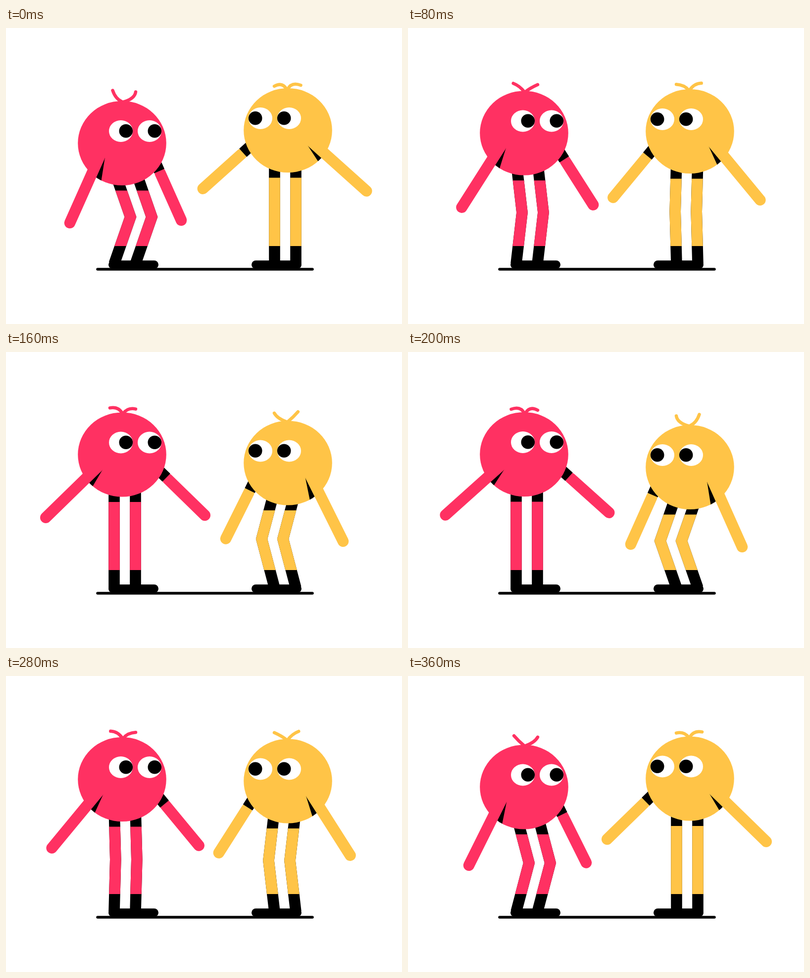
Recreate the animation shown at these times as an HTML page with a canvas. Size 800x600 px, loop 400 ms.

```html
<!DOCTYPE html>
<html lang="en">
<head>
<meta charset="utf-8">
<title>Two bouncing friends</title>
<style>
  html, body { margin: 0; height: 100%; overflow: hidden; background: #fff; }
  canvas { display: block; }
</style>
</head>
<body>
<canvas id="stage" width="800" height="600"></canvas>
<script>
const ctx = document.getElementById('stage').getContext('2d');
const STEP = 40, STEPS = 10, AXIS = 402;
const LIMB = 22.6, BODY_X = 234.5, ANKLE_X = 218.5, LEG_GAP = 43;

// From crouching to standing; hair control points are relative to the body.
const poses = [
  { y: 233.5, arm: 24,   knee: [251.5, 383], hair: [221, -90, 260, -90] },
  { y: 225,   arm: 26.4, knee: [244.5, 379], hair: [223.5, -93, 256, -90] },
  { y: 213,   arm: 32.4, knee: [230.5, 374], hair: [225.5, -96, 247, -91.5] },
  { y: 209.5, arm: 39.5, knee: [221.3, 372], hair: [226, -97, 246, -94.5] },
  { y: 208,   arm: 45.6, knee: [218.5, 371], hair: [227, -98, 246, -96] },
  { y: 207.5, arm: 48,   knee: [218.5, 371], hair: [227, -98.5, 246, -98.5] }
];

function stroke(color, width, cap, points) {
  ctx.strokeStyle = color;
  ctx.lineWidth = width;
  ctx.lineCap = cap;
  ctx.beginPath();
  points.forEach(p => ctx.lineTo(...p));
  ctx.stroke();
}

function ellipse(color, x, y, rx, ry = rx) {
  ctx.fillStyle = color;
  ctx.beginPath();
  ctx.ellipse(x, y, rx, ry, 0, 0, Math.PI * 2);
  ctx.fill();
}

// Draws in a frame turned so that the limb points along +y.
function rotated(x, y, degrees, draw) {
  ctx.save();
  ctx.translate(x, y);
  ctx.rotate(degrees * Math.PI / 180);
  draw();
  ctx.restore();
}

function drawLeg(color, pose, dx) {
  const [kx, ky] = pose.knee;
  const leg = [[ANKLE_X + dx, 2 * ky - 478], [kx + dx, ky], [ANKLE_X + dx, 478]];
  stroke('#000', LIMB, 'butt', leg);
  ctx.save();
  ctx.beginPath();
  ctx.rect(0, pose.y + 96, 800, 442 - pose.y - 96);
  ctx.clip();
  stroke(color, LIMB, 'butt', leg);
  ctx.restore();
  stroke('#000', 17, 'round', [[215.5 + dx, 479.8], [256.5 + dx, 479.8]]);
}

function drawHair(color, pose, u) {
  const [lx, ly, rx, ry] = pose.hair;
  const top = pose.y;
  ctx.strokeStyle = color;
  ctx.lineWidth = 6.5;
  ctx.lineCap = 'round';
  ctx.beginPath();
  ctx.moveTo(215.5 - 1.4 * u, top - 107 + 3.1 * u);
  ctx.quadraticCurveTo(lx, top + ly, 235, top - 83.5);
  ctx.moveTo(262, top - 104 + 2.9 * u);
  ctx.quadraticCurveTo(rx, top + ry, 237, top - 83.5);
  ctx.stroke();
}

function drawFigure(color, u) {
  const pose = poses[u], y = pose.y;
  drawHair(color, pose, u);
  drawLeg(color, pose, 0);
  drawLeg(color, pose, LEG_GAP);

  rotated(291, y + 14.5, -pose.arm, () => {
    stroke(color, LIMB, 'round', [[0, 50], [0, 155]]);
    stroke('#000', LIMB, 'butt', [[0, 0], [0, 46]]);
  });

  ellipse(color, BODY_X, y, 89.3, 85.6);
  for (const x of [232, 290]) {
    ellipse('#fff', x, y - 24.5, 24, 22);
    ellipse('#000', x + 10.3, y - 24.7, 13.8);
  }

  // The gap under the front arm shows only on the body.
  ctx.save();
  ctx.beginPath();
  ctx.ellipse(BODY_X, y, 89.3, 85.6, 0, 0, Math.PI * 2);
  ctx.clip();
  rotated(193.3, y + 17, pose.arm, () => {
    ctx.fillStyle = '#000';
    ctx.beginPath();
    ctx.moveTo(11, 8.5);
    ctx.lineTo(11, 88.5);
    ctx.lineTo(32.4, 88.5);
    ctx.fill();
  });
  ctx.restore();

  rotated(193.3, y + 17, pose.arm, () =>
    stroke(color, LIMB, 'round', [[0, 12], [0, 158.2]]));
}

function render(now) {
  const step = Math.floor(now / STEP) % STEPS;
  const u = 5 - Math.abs(5 - step);
  ctx.fillStyle = '#fff';
  ctx.fillRect(0, 0, 800, 600);
  stroke('#000', 5.5, 'round', [[185, 489], [619, 489]]);
  drawFigure('#ff3162', u);
  ctx.save();
  ctx.translate(2 * AXIS, 0);
  ctx.scale(-1, 1);
  drawFigure('#ffc447', 5 - u);
  ctx.restore();
}

function loop() {
  render(performance.now());
  requestAnimationFrame(loop);
}
loop();
</script>
</body>
</html>
```
